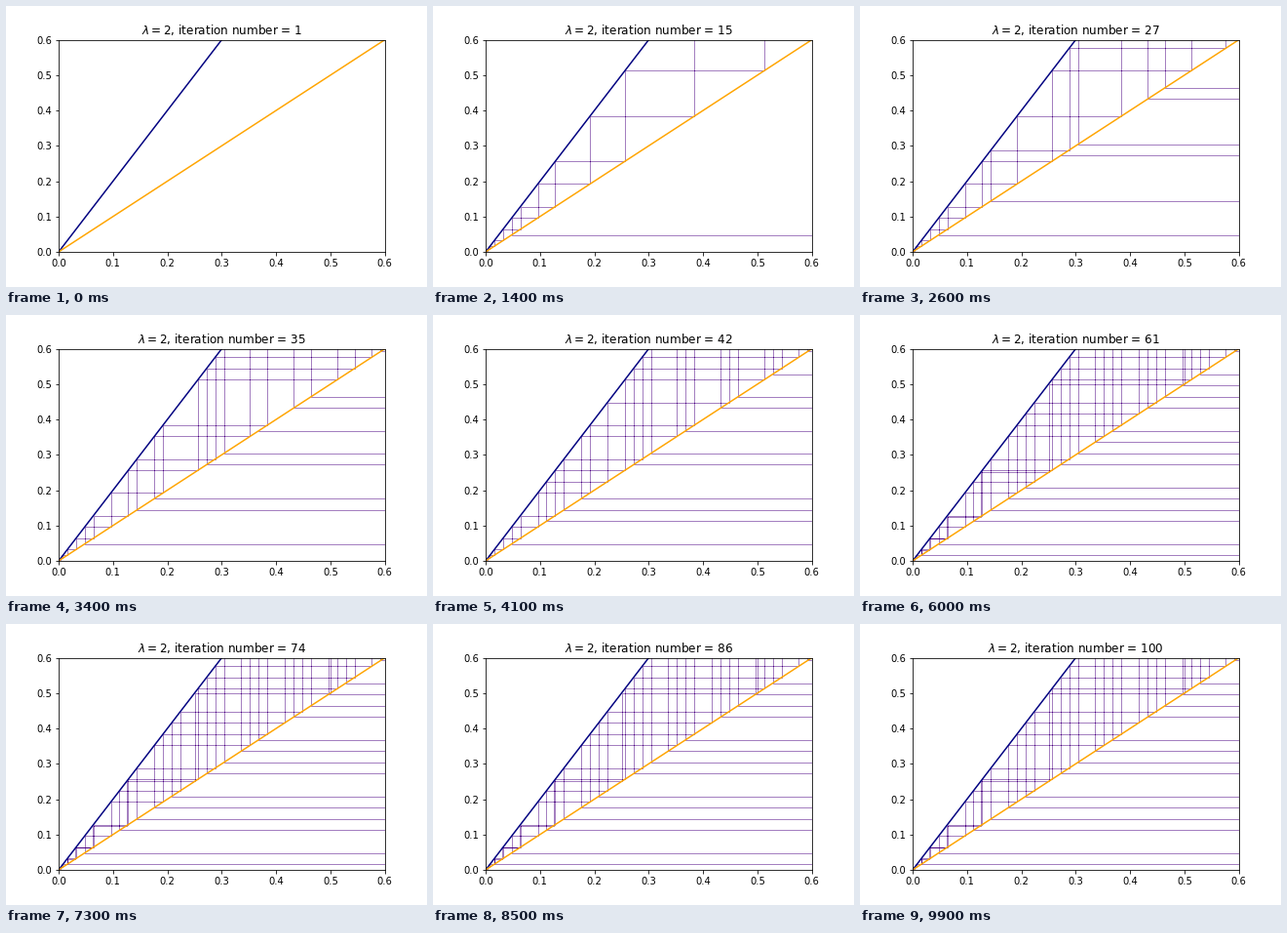
These frames come from a looping animation (432 px wide and 288 px high, 10 s). A matplotlib script:

```python
import matplotlib.pyplot as plt
from matplotlib.animation import FuncAnimation

STEPS = 100
RATE = 2
LIMIT = 0.6


def tent(x):
    return RATE * min(x, 1 - x)


def cobweb(x, steps):
    """Corner points of the staircase: up to the map, across to the diagonal."""
    xs, ys = [x], [x]
    for _ in range(steps):
        y = tent(x)
        xs += [x, y]
        ys += [y, y]
        x = y
    return xs, ys


xs, ys = cobweb(0.001, STEPS)

fig, ax = plt.subplots(figsize=(6, 4), dpi=72)
fig.subplots_adjust(bottom=0.125)
web, = ax.plot([], [], color="indigo", lw=0.5)
ax.plot([0, 0.5, 1], [0, RATE / 2, 0], color="navy")
ax.plot([0, 1], [0, 1], color="orange")
ax.set_xlim(0, LIMIT)
ax.set_ylim(0, LIMIT)
title = ax.set_title("")


def draw(i):
    n = i + 1
    web.set_data(xs[:2 * n + 1], ys[:2 * n + 1])
    title.set_text(rf"$\lambda = {RATE}$, iteration number = {n}")
    return web, title


anim = FuncAnimation(fig, draw, frames=STEPS, interval=100,
                     repeat=True, repeat_delay=0)
plt.show()
```
